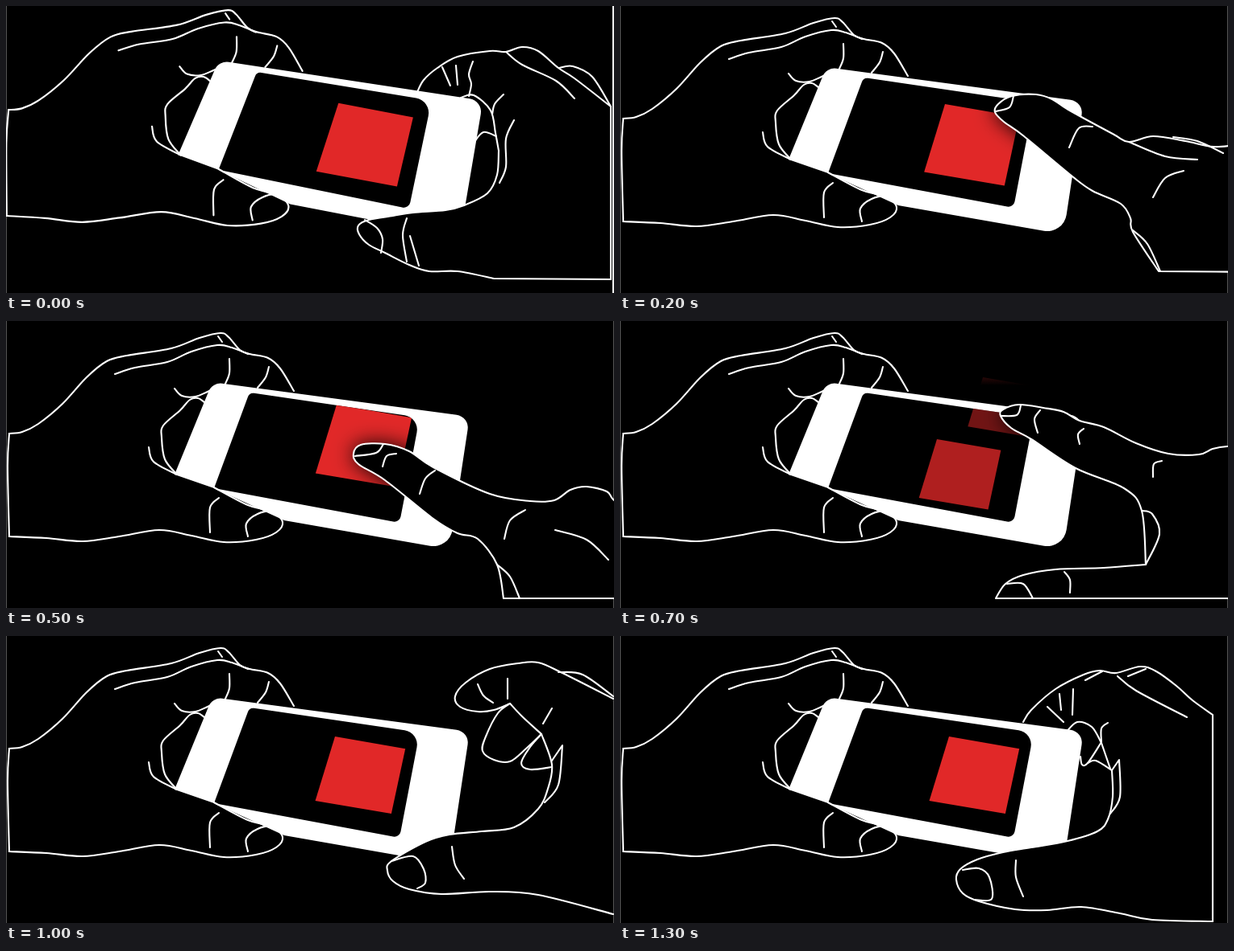
These frames come from a looping animation (754 by 357 pixels, 1.4 s). An HTML page with a canvas:

```html
<!DOCTYPE html>
<html>
<head>
<meta charset="utf-8">
<style>
html, body { margin: 0; width: 100%; height: 100%; overflow: hidden; background: #000; }
canvas { display: block; }
</style>
</head>
<body>
<canvas id="stage" width="754" height="357"></canvas>
<script>
const ctx = document.getElementById('stage').getContext('2d');
const STEP = 100, STEPS = 14, RED = '#e12828';

// A stroke is a smooth curve through key points; a repeated point is a corner.
function curve(text) {
  const n = text.split(' ').map(Number);
  const at = i => n.slice(2 * i, 2 * i + 2);
  const last = n.length / 2 - 1;
  const path = new Path2D();
  path.moveTo(...at(0));
  for (let i = 0; i < last; i++) {
    const a = at(Math.max(i - 1, 0)), b = at(i), c = at(i + 1), d = at(Math.min(i + 2, last));
    if (String(b) === String(c)) continue;
    path.bezierCurveTo(
      b[0] + (c[0] - a[0]) / 6, b[1] + (c[1] - a[1]) / 6,
      c[0] - (d[0] - b[0]) / 6, c[1] - (d[1] - b[1]) / 6, ...c);
  }
  return path;
}

function rounded(corners) {
  const path = new Path2D();
  path.moveTo(...corners[corners.length - 1]);
  corners.forEach(([x, y, r = 0], i) => {
    const [nx, ny] = corners[(i + 1) % corners.length];
    path.arcTo(x, y, nx, ny, r);
  });
  path.closePath();
  return path;
}

const body = rounded([[209, 191], [256, 76, 16], [575, 119, 16], [550, 284, 24], [345, 248], [258, 208]]);
const screen = rounded([[302, 89, 7], [513, 120, 18], [488, 251, 8], [258, 208]]);

const holder = [
  '4 140 20 138 40 128 70 103 100 70 125 50 150 43 205 34 240 21 266 15 276 20 290 36 302 41 325 46 340 59 357 87',
  '135 66 160 58 200 51 230 38 262 30 280 33 300 41', '263 19 268 26',
  '277 47 277 65 272 78', '326 57 322 70 312 83',
  '209 84 218 93 235 94 252 87 272 79',
  '246 101 238 96 228 98 216 111 195 130 193 145 197 172 212 191',
  '177 157 183 175 212 191', '4 140 2 180 4 268',
  '4 268 50 270 95 274 140 268 190 260 230 267 270 275 310 272 335 263 343 250 330 237 312 240 298 252 300 268',
  '258 207 300 229 330 236', '264 220 253 232 253 263'
].map(curve);

// A hand passes its drawn place at step `at` and drifts steadily around it.
// Its first stroke also bounds the black mass that covers the phone.
const hand = (from, at, drift, strokes) => ({ from, at, drift, lines: strokes.map(curve) });

const hands = [
  hand(0, 0, [0, 0], [
    '611 180 609 210 597 233 568 248 545 254 505 257 480 261 450 266 437 273 438 284 450 297 470 307 500 322 525 330 560 330 605 339 605 339 750 340',
    '510 107 518 92 535 77 560 63 600 56 620 57 640 51 660 56 685 77 705 90 750 125',
    '686 77 703 75 727 88 750 125', '750 125 750 340', '620 57 640 73 682 93 705 115',
    '541 76 551 99', '558 74 560 98', '579 69 574 85 577 97 574 112',
    '564 114 580 111 601 130 607 158 611 180', '617 110 606 122 603 135',
    '580 170 592 157 608 162', '630 142 620 165 620 200 612 220',
    '445 266 460 276 467 290 465 307', '497 264 492 285 497 318', '501 286 512 323'
  ]),
  hand(1, 1, [0, 0], [
    '596 148 602 170 618 205 615 235 608 255 595 267 575 271 552 271 500 268 460 271 435 277 428 285 445 310 490 335 515 338 775 338',
    '570 119 556 102 520 82 498 74 492 67 505 55 540 44 570 46 605 57 625 52 650 38 672 37 690 52 703 72 712 88 753 128',
    '703 72 715 68 728 75 753 105', '606 56 640 90 672 115',
    '575 66 590 56 608 55', '648 56 658 47 680 44', '547 70 543 88', '724 84 738 79',
    '570 119 596 140 596 148 580 149 575 145', '435 277 455 285 463 295 463 320',
    '502 283 499 300 502 326'
  ]),
  hand(2, 3, [-36, 16], [
    '775 194 753 194 735 189 700 191 665 184 625 178 595 185 575 175 520 145 500 132 480 126 450 128 433 138 429 148 440 160 465 178 525 228 550 246 585 262 597 280 600 297 632 346 632 346 775 347',
    '600 295 618 312 634 346', '595 185 640 203 680 207', '650 179 680 184 712 199',
    '550 166 533 168 521 192', '663 221 640 230 625 254', '452 128 447 142 430 147'
  ]),
  hand(4, 5, [10, -14], [
    '775 240 753 222 745 212 720 206 700 210 680 223 650 224 600 215 530 182 500 162 470 153 440 154 431 165 437 178 470 198 530 246 560 264 585 271 609 303 617 345 617 345 775 345',
    '609 303 625 318 637 345', '468 153 459 164 433 168', '484 165 472 168 467 181',
    '532 186 520 196 513 215', '644 235 625 248 618 271', '681 260 720 272 747 297'
  ]),
  hand(7, 7, [30, -10], [
    '775 157 753 156 735 159 718 166 680 165 640 152 600 132 570 124 550 113 525 108 495 104 475 110 472 118 485 133 510 147 565 183 625 208 647 236 652 303 652 303 600 307 540 309 500 316 478 327 466 345 466 345 775 345',
    '647 236 660 240 669 265 652 303', '480 327 500 327 512 345', '551 312 558 322 558 338',
    '521 111 514 122 518 139', '575 134 568 141 570 153', '672 174 662 178 661 194',
    '497 105 492 117 472 118'
  ]),
  hand(9, 10, [-10, 8], [
    '664 122 677 160 672 190 660 215 630 238 590 243 550 247 520 256 478 280 473 292 480 305 500 315 540 321 600 318 660 322 753 346',
    '753 78 690 46 660 33 635 34 600 41 570 58 557 75 563 88 585 94 605 92 625 84 625 84 610 96 595 125 591 143 605 154 625 156 645 140 664 122',
    '625 84 640 100 664 122', '664 122 650 138 639 158 650 166 677 163',
    '677 155 690 136 690 136 685 185 668 207', '585 60 592 74 604 83', '622 53 622 78',
    '677 90 666 109', '685 45 715 48 753 75', '478 280 505 274 518 290 520 307 510 314',
    '553 262 557 285 568 302'
  ]),
  hand(11, 13, [-6, 8], [
    '610 167 611 200 605 228 592 243 555 255 510 263 475 269 443 278 422 290 417 303 425 320 445 330 490 340 530 341 572 337 620 345 660 353 735 355',
    '500 107 510 92 540 66 575 48 595 43 615 46 645 38 665 44 690 62 710 80 735 98 735 98 735 355',
    '617 50 640 68 703 101', '577 55 598 44', '630 50 652 41', '530 88 550 107', '545 72 547 92',
    '562 66 561 98', '553 120 567 107 585 113 597 133', '605 108 597 115 597 132 597 132 580 158 573 160 571 150',
    '597 133 608 165', '580 158 590 155 610 167', '610 167 619 154 619 154 620 200 608 221',
    '425 291 445 289 458 300 461 327 440 328', '491 279 491 300 500 324'
  ])
];

// Keys are [step, ...values], joined by straight lines.
function track(keys, t) {
  const i = keys.findIndex(k => k[0] >= t);
  if (i < 0) return keys[keys.length - 1].slice(1);
  if (i === 0) return keys[0].slice(1);
  const [a, b] = [keys[i - 1], keys[i]];
  const f = (t - a[0]) / (b[0] - a[0]);
  return a.slice(1).map((v, j) => v + (b[j + 1] - v) * f);
}

// Phone corner, turn in degrees and scale.
const grip = [[0, 311, 82, 1, 1.03], [1, 303, 84, .7, 1.01], [2, 302, 89, 0, 1]];
// Tile corner, size and strength.
const thrown = [[1, 401, 125, 92, 1], [2, 403, 122, 94, 1], [4, 403, 122, 94, 1],
  [5, 410, 104, 95, 1], [7, 450, 70, 68, .5], [8, 470, 53, 55, 0]];
const fresh = [[6, 378, 169, 73, 0], [7, 393, 147, 81, .78], [9, 408, 125, 89, 1]];

function tile([x, y, size, alpha], color = RED) {
  ctx.globalAlpha = alpha;
  ctx.fillStyle = color;
  ctx.beginPath();
  for (const [u, v] of [[0, 0], [.98, .17], [.785, 1.08], [-.275, .9]]) {
    ctx.lineTo(x + u * size, y + v * size);
  }
  ctx.fill();
  ctx.globalAlpha = 1;
}

function fill(path, color) {
  ctx.fillStyle = color;
  ctx.fill(path);
}

function edges(opening) {
  ctx.fillStyle = '#555';
  ctx.fillRect(0, 0, 1, 357);
  ctx.fillRect(753, 0, 1, 357);
  if (opening) {
    ctx.fillStyle = '#fff';
    ctx.fillRect(752, 0, 2, 357);
  }
}

const glow = ctx.createLinearGradient(0, 70, 0, 80);
glow.addColorStop(0, 'rgba(225,40,40,.35)');
glow.addColorStop(1, 'rgba(225,40,40,0)');

function draw(step) {
  const [x, y, turn, scale] = track(grip, step);
  const { at, drift, lines } = hands.filter(h => h.from <= step).pop();
  const dx = drift[0] * (step - at), dy = drift[1] * (step - at);
  const old = track(thrown, step);

  ctx.fillStyle = '#000';
  ctx.fillRect(0, 0, 754, 357);
  edges(step < 2);

  ctx.save();
  ctx.translate(x, y);
  ctx.rotate(turn * Math.PI / 180);
  ctx.scale(scale, scale);
  ctx.translate(-302, -89);
  tile(old, glow);
  fill(body, '#fff');
  fill(screen, '#000');
  holder.forEach(line => ctx.stroke(line));

  ctx.clip(screen);
  tile(old);
  tile(track(fresh, step));
  ctx.setTransform(1, 0, 0, 1, dx, dy);
  ctx.shadowColor = '#000';
  ctx.shadowBlur = 26;
  fill(lines[0], '#000');
  ctx.restore();

  ctx.save();
  ctx.translate(dx, dy);
  fill(lines[0], '#000');
  lines.forEach(line => ctx.stroke(line));
  ctx.restore();
}

ctx.strokeStyle = '#fff';
ctx.lineWidth = 2.1;
ctx.lineCap = ctx.lineJoin = 'round';
const start = performance.now();

function tick() {
  const time = Math.max(0, performance.now() - start);
  draw(Math.floor(time / STEP) % STEPS);
  requestAnimationFrame(tick);
}
tick();
</script>
</body>
</html>
```
